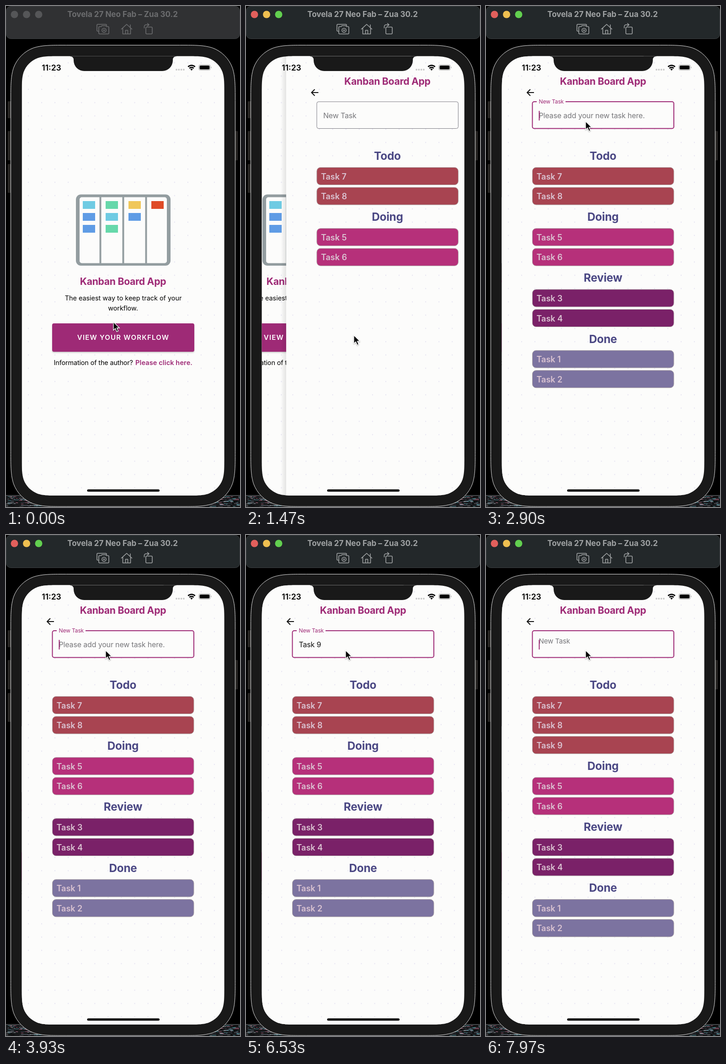
An HTML page that plays this animation: 512x1094 px, repeating every 8 s.

```html
<!DOCTYPE html>
<html lang="en">
<head>
<meta charset="utf-8">
<title>Kanban Board App</title>
<style>
  html, body { margin: 0; width: 100%; height: 100%; overflow: hidden; background: #000; }
  svg { display: block; width: 100%; height: 100%; }
  text { font-family: Inter, "Open Sans", sans-serif; white-space: pre; }
  .body { font-size: 14.4px; }
  .note { font-size: 14.4px; letter-spacing: -.12px; }
  .link { font-size: 14.6px; font-weight: 600; letter-spacing: .08px; }
  .title { font-size: 21.2px; font-weight: 700; letter-spacing: -.3px; fill: #9e2a76; }
  .heading { font-size: 24.3px; font-weight: 700; letter-spacing: -.2px; fill: #4b4884; }
  .task { font-size: 18px; font-weight: 600; fill: #dac3d1; }
  .field { font-size: 16px; letter-spacing: -.01em; }
  .mid { text-anchor: middle; }
</style>
</head>
<body>
<svg id="stage" viewBox="0 0 512 1094" xmlns="http://www.w3.org/2000/svg"></svg>
<script>
const LOOP = 8000;
const PURPLE = '#9e2a76', PAPER = '#fcfcfb', GREY = '#77777b';
const SCREEN_X = 34.5, SCREEN_W = 443.3;
const OPEN = 1470, SETTLE = 1730, ACTIVATE = 900;
const FOCUS = 2560, SUBMIT = 7035, REFOCUS = 7923;
const KEYS = [[4480, 'T'], [4680, 'a'], [4880, 's'], [5090, 'k'], [5350, ' '], [5930, '9']];
const POINTER = [[0, 235, 690], [70, 235, 690], [570, 236, 719], [1720, 236, 719],
                 [2030, 220, 304], [2420, 218, 252], [LOOP, 218, 252]];
const SECTIONS = [
  ['Todo', '#a84451', [7, 8]],
  ['Doing', '#b6307a', [5, 6]],
  ['Review', '#7a2168', [3, 4]],
  ['Done', '#7c73a0', [1, 2]]
];

const rect = (x, y, w, h, fill, more = '') =>
  `<rect x="${x}" y="${y}" width="${w}" height="${h}" fill="${fill}" ${more}/>`;
const text = (x, y, cls, str, more = '') =>
  `<text x="${x}" y="${y}" class="${cls}" ${more}>${str}</text>`;

// Rounded rectangle whose corners ease into the straight sides.
function smoothRect(x, y, w, h, r) {
  const curve = [[1.529, 0], [1.088, 0], [.868, 0], [.631, .075], [.373, .169], [.169, .373],
                 [.075, .631], [0, .868], [0, 1.088], [0, 1.529]];
  const corner = (right, bottom) => {
    const points = curve.map(([a, b]) =>
      `${(right ? x + w - a * r : x + a * r).toFixed(2)} ${(bottom ? y + h - b * r : y + b * r).toFixed(2)}`);
    if (right === bottom) points.reverse();
    return points[0] + 'C' + points.slice(1).join(' ');
  };
  return 'M' + [corner(0, 0), corner(1, 0), corner(1, 1), corner(0, 1)]
    .map((c, i) => i === 0 || i === 2 ? c : c).join('L') + 'Z';
}

function outline(x, y, w, h, r) {
  const a = 1.529 * r, b = 1.088 * r, c = .868 * r, d = .631 * r, e = .075 * r, f = .373 * r, g = .169 * r;
  const turn = (dx, dy) => {
    // (dx, dy) is the direction of travel; the path always turns right.
    const p = (along, side) => `${along * dx - side * dy} ${along * dy + side * dx}`;
    return `c${p(a - b, 0)} ${p(a - c, 0)} ${p(a - d, e)}` +
      `c${p(d - f, g - e)} ${p(d - g, f - e)} ${p(d - e, d - e)}` +
      `c${p(e, c - d)} ${p(e, b - d)} ${p(e, a - d)}`;
  };
  return `M${x + a} ${y}H${x + w - a}${turn(1, 0)}V${y + h - a}${turn(0, 1)}` +
    `H${x + a}${turn(-1, 0)}V${y + a}${turn(0, -1)}Z`;
}

function desktopStrip() {
  let seed = 7, out = rect(0, 1069, 512, 25, '#17181a') + rect(0, 1068, 512, 1.5, '#55575a');
  const random = () => (seed = seed * 16807 % 2147483647) / 2147483647;
  const tones = ['#6c7480', '#9aa0a6', '#3c4450', '#a05a72', '#4b8a94', '#000', '#45464c'];
  for (let i = 0; i < 260; i++) {
    const side = i % 2 ? 430 : 0;
    out += rect((side + random() * 82).toFixed(1), 1071 + Math.floor(random() * 22),
      (2 + random() * 9).toFixed(1), 1, tones[Math.floor(random() * tones.length)]);
  }
  return out;
}

function windowBar() {
  return `
    <rect id="bar" x=".5" y=".5" width="511" height="71" rx="10" stroke="#3d4043"/>
    <circle class="light" cx="18.5" cy="18.5" r="8"/>
    <circle class="light" cx="45" cy="18.5" r="8"/>
    <circle class="light" cx="71.5" cy="18.5" r="8"/>
    <g id="chrome">
      ${text(255, 24, 'mid', 'Tovela 27 Neo Fab – Zua 30.2', 'font-size="17" font-weight="700" fill="currentColor"')}
      <g fill="none" stroke="currentColor" stroke-width="1.6" stroke-linejoin="round" stroke-linecap="round">
        <path d="M202 55h-1a2 2 0 0 1-2-2V42a2 2 0 0 1 2-2h17a2 2 0 0 1 2 2v1"/>
        <path d="M205 45h3l2-2h8l2 2h3a2 2 0 0 1 2 2v12a2 2 0 0 1-2 2h-18a2 2 0 0 1-2-2V47a2 2 0 0 1 2-2z"/>
        <circle cx="214.5" cy="53" r="4.5"/><circle cx="214.5" cy="53" r="1"/>
        <path d="M252.5 50.5 264 40l11.5 10.5M255.500 49v12h17V49M261.500 61v-8h5v8M272 46v-5"/>
        <path d="M308 46h10a2 2 0 0 1 2 2v11a2 2 0 0 1-2 2h-10a2 2 0 0 1-2-2V48a2 2 0 0 1 2-2zM302.500 48v-3a4 4 0 0 1 4-4h6M309.500 38l3.500 3-3.500 3"/>
      </g>
    </g>`;
}

function phoneBody() {
  const button = (x, y, h) => rect(x, y, 6.5, h, '#2a2826', 'rx="1.5"');
  return button(4, 208, 37) + button(4, 273, 64) + button(4, 345, 63) + button(500.5, 273, 64) +
    `<path d="${outline(10.5, 85.5, 491, 1007.5, 79)}" fill="#191919" stroke="#e6e6e6"/>`;
}

function boardIcon() {
  const c = { cyan: '#6fcbe3', blue: '#5f9ce5', green: '#66d8aa', yellow: '#f0c75a', red: '#df4b27' };
  const columns = ['cyan blue blue', 'green cyan green', 'yellow blue', 'red'];
  let out = rect(153, 411.5, 207, 155.5, '#939da0', 'rx="11"') + rect(161, 417.5, 191, 144, PAPER, 'rx="5"');
  columns.forEach((names, i) => {
    if (i) out += rect(154.5 + i * 50, 415, 4, 149, '#939da0');
    names.split(' ').forEach((name, j) => { out += rect(168 + i * 50, 426 + j * 26, 27, 17, c[name]); });
  });
  return out;
}

const pageBackground = rect(SCREEN_X, 109, SCREEN_W, 961, PAPER) + rect(SCREEN_X, 109, SCREEN_W, 961, 'url(#dots)');

function welcomePage() {
  return pageBackground + boardIcon() +
    text(256, 608.5, 'title mid', 'Kanban Board App') +
    text(256.5, 643, 'body mid', 'The easiest way to keep track of your') +
    text(256, 664.5, 'body mid', 'workflow.') +
    rect(101, 695, 311, 62, '#000', 'rx="4" opacity=".2" filter="url(#soft)"') +
    rect(101, 693, 311, 62, PURPLE, 'rx="4"') +
    rect(101, 693, 311, 62, '#fff', 'id="press" rx="4" opacity="0"') +
    text(256.5, 729, 'mid', 'VIEW YOUR WORKFLOW', 'font-size="15" font-weight="600" letter-spacing="1.2" fill="#fff"') +
    text(104.5, 783.5, 'note', 'Information of the author?') +
    text(283, 783.5, 'link', 'Please click here.', `fill="${PURPLE}"`);
}

function boardPage() {
  return rect(SCREEN_X - 12, 109, 12, 961, 'url(#edge)') + pageBackground +
    text(256, 171.5, 'title mid', 'Kanban Board App') +
    '<path d="M105 189H90m7-7-7 7 7 7" fill="none" stroke="#111" stroke-width="2"/>' +
    rect(101.5, 209, 309.5, 58.5, PAPER, 'id="box" rx="4"') +
    rect(111, 206, 63, 5, PAPER, 'id="gap"') +
    text(115.5, 245, 'field', 'New Task', 'id="label"') +
    text(115.5, 245, 'field', 'Please add your new task here.', `id="hint" fill="${GREY}"`) +
    text(115.5, 245, 'field', '', 'id="typed" fill="#111"') +
    rect(115.5, 229, 2, 21, PURPLE, 'id="caret"') +
    '<g id="lists"></g>';
}

function statusBar() {
  let dots = '';
  for (let i = 0; i < 4; i++) dots += `<circle cx="${373 + i * 5.3}" cy="139" r="1.9" fill="#c9c9c9"/>`;
  return text(99.5, 140.5, 'mid', '11:23', 'font-size="17.5" font-weight="600"') + dots + `
    <g fill="none" stroke="#000" stroke-width="2.6">
      <path d="M398.300 132.800a11 11 0 0 1 15.400 0M401.200 136a7 7 0 0 1 9.600 0"/>
    </g>
    <path d="M403.300 138.200a4 4 0 0 1 5.400 0l-2.700 2.800z"/>
    <rect x="421.8" y="128.3" width="25.4" height="12" rx="3.6" fill="none" stroke="#a5a5a5"/>
    <rect x="423.6" y="130" width="21.8" height="8.6" rx="2.2"/>
    <path d="M448.700 132.300q2.200 2 0 4z" fill="#a5a5a5"/>` +
    rect(177.5, 1055.5, 158.5, 5, '#000', 'rx="2.5"') +
    '<path d="M140 108H373V110Q365 110 365 118V119A23 23 0 0 1 342 142H171A23 23 0 0 1 148 119V118Q148 110 140 110Z" fill="#191919"/>';
}

const stage = document.getElementById('stage');
stage.innerHTML = `
  <defs>
    <pattern id="dots" x="63.5" y="167.5" width="29.08" height="29" patternUnits="userSpaceOnUse">
      <circle cx="14.5" cy="14.5" r="1" fill="#d9d6ec"/>
    </pattern>
    <linearGradient id="edge"><stop stop-opacity="0"/><stop offset="1" stop-opacity=".1"/></linearGradient>
    <filter id="soft"><feGaussianBlur stdDeviation="1.5"/></filter>
    <clipPath id="screen"><path d="${outline(SCREEN_X, 109.5, SCREEN_W, 959.5, 55)}"/></clipPath>
  </defs>
  ${rect(0, 0, 512, 1094, '#000')}
  ${desktopStrip()}${windowBar()}${phoneBody()}
  <g clip-path="url(#screen)">
    <g id="welcome">${welcomePage()}</g>
    <g id="board">${boardPage()}</g>
    ${statusBar()}
  </g>
  <path id="pointer" d="M0 0V18L4.200 14.200 7.300 21.300 10.500 20 7.500 13H13.200Z" stroke="#fff" stroke-width="1.3"
    style="filter:drop-shadow(0 1px 1px rgba(0,0,0,.35))"/>`;

const el = id => document.getElementById(id);
const set = (id, attrs) => { for (const k in attrs) el(id).setAttribute(k, attrs[k]); };
const show = (id, visible) => set(id, { visibility: visible ? 'inherit' : 'hidden' });
const ease = p => { p = Math.min(1, Math.max(0, p)); return p * p * (3 - 2 * p); };

function listsMarkup(count, added) {
  let y = 327, out = '';
  SECTIONS.slice(0, count).forEach(([name, color, ids], i) => {
    const tasks = added && i === 0 ? [...ids, 9] : ids;
    out += text(256, y + 9, 'heading mid', name);
    tasks.forEach((id, j) => {
      const top = y + 25.5 + j * 43.6;
      out += rect(101.5, top, 309.5, 38, color, 'rx="8" stroke="#aea7a6"') +
        text(110.5, top + 26, 'task', 'Task ' + id);
    });
    y += 46 + tasks.length * 43.6;
  });
  return out;
}

let listState = '';
function drawLists(t) {
  const count = t < SETTLE ? 2 : 4, added = t >= SUBMIT, state = count + '/' + added;
  if (state === listState) return;
  listState = state;
  el('lists').innerHTML = listsMarkup(count, added);
}

function drawWindow(t) {
  const active = t >= ACTIVATE;
  set('bar', { fill: active ? '#23282a' : '#303133' });
  set('chrome', { color: active ? '#a0a3a4' : '#6c6d6f' });
  const lights = active ? ['#e2605c', '#efbf50', '#62cf4f'] : ['#555658', '#555658', '#555658'];
  document.querySelectorAll('.light').forEach((c, i) => c.setAttribute('fill', lights[i]));
}

function drawPages(t) {
  const x = t < OPEN ? SCREEN_W : t < SETTLE ? 53.4 : 2 * Math.exp((SETTLE - t) / 60);
  set('welcome', { transform: `translate(${-0.3 * (SCREEN_W - x)} 0)` });
  set('board', { transform: `translate(${x} 0)` });
  show('board', t >= OPEN);
  set('press', { opacity: t >= 1100 && t < 1200 ? 0.15 : 0 });
}

function drawField(t) {
  const focused = t >= FOCUS && t < SUBMIT || t >= REFOCUS;
  const lift = t < SUBMIT ? ease((t - FOCUS) / 150)
    : t < REFOCUS ? 1 - ease((t - SUBMIT) / 150) : ease((t - REFOCUS) / 150);
  const raised = focused && lift > 0.5;
  const pressed = t < SUBMIT ? KEYS.filter(([at]) => t >= at) : [];
  const value = pressed.map(([, key]) => key).join('');
  const lastEvent = t >= REFOCUS ? REFOCUS : pressed.length ? pressed[pressed.length - 1][0] : FOCUS;

  set('box', { stroke: focused ? PURPLE : '#7c7b84', 'stroke-width': focused ? 2 : 1 });
  show('gap', raised);
  set('label', { y: 245 - 32.5 * lift, fill: raised ? PURPLE : GREY });
  el('label').style.fontSize = 16 - 4 * lift + 'px';
  show('hint', focused && lift === 1 && !value);
  el('typed').textContent = value;
  set('caret', { x: 115.5 + (value ? el('typed').getComputedTextLength() : 0) });
  show('caret', focused && (t - lastEvent) % 1000 < 550);
}

function drawPointer(t) {
  const i = Math.max(1, POINTER.findIndex(([at]) => at > t));
  const [t0, x0, y0] = POINTER[i - 1], [t1, x1, y1] = POINTER[i];
  const p = ease((t - t0) / (t1 - t0));
  set('pointer', { transform: `translate(${x0 + (x1 - x0) * p} ${y0 + (y1 - y0) * p})` });
}

function draw(t) {
  drawWindow(t);
  drawPages(t);
  drawLists(t);
  drawField(t);
  drawPointer(t);
}

const start = performance.now();
function tick() {
  draw((performance.now() - start) % LOOP);
  requestAnimationFrame(tick);
}
tick();
</script>
</body>
</html>
```
